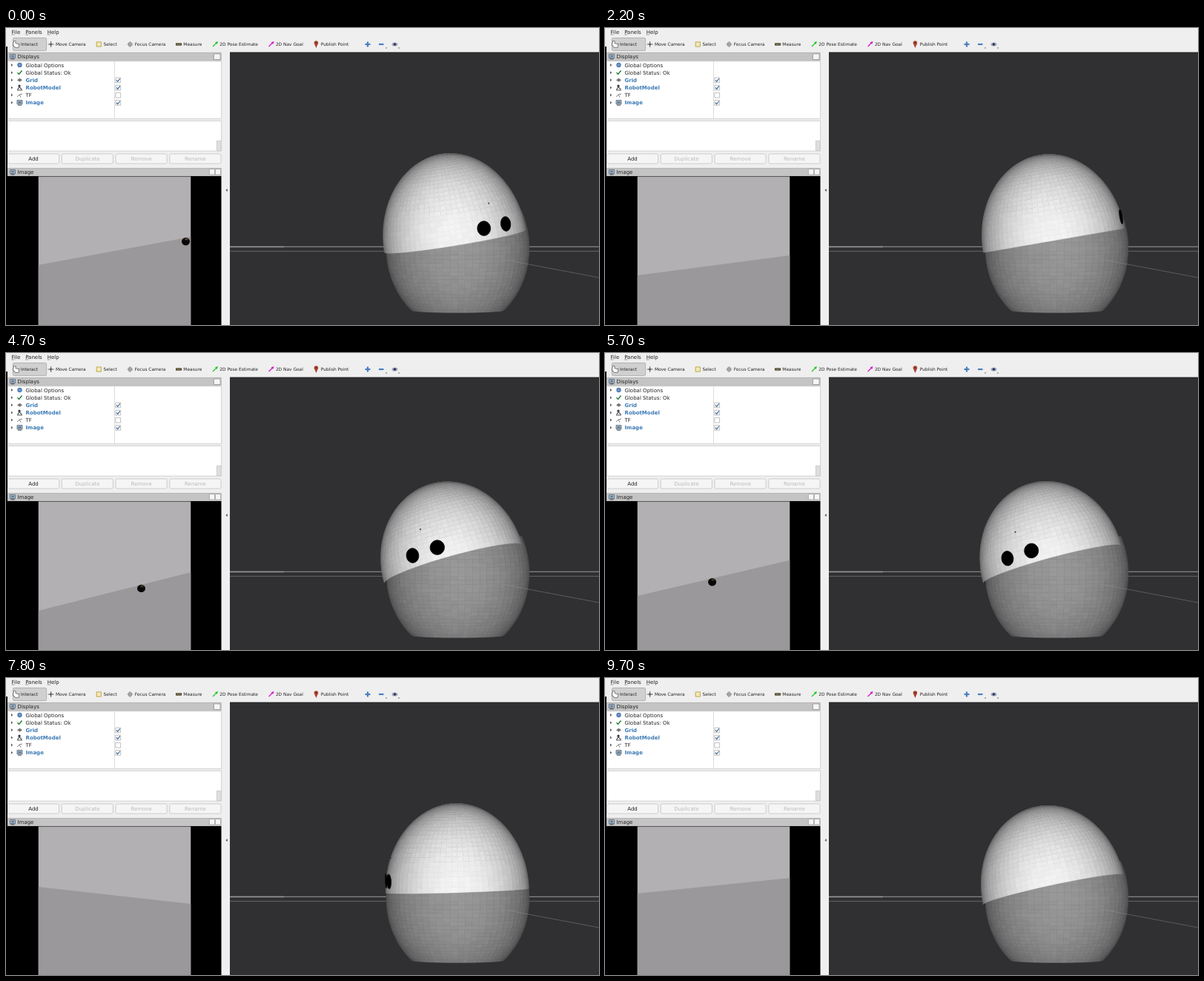
An HTML page with a canvas that plays this animation: 800 px wide and 401 px high, repeating every 9800 ms.

```html
<!DOCTYPE html>
<html lang="en">
<head>
<meta charset="utf-8">
<title>Robot head viewer</title>
<style>
html, body { margin: 0; width: 100%; height: 100%; overflow: hidden; background: #efefef; }
canvas { display: block; }
</style>
</head>
<body>
<canvas id="stage" width="800" height="401"></canvas>
<script>
const W = 800, H = 401, LOOP = 9800, STEP = 100;
const RAD = Math.PI / 180, TURN = Math.PI * 2;
const FONT = '"DejaVu Sans", sans-serif';
const stage = document.getElementById('stage').getContext('2d');

// time, yaw, roll, pitch, horizon height, horizon rise
const POSES = [
  [0, 36.5, -9.2, -3.5, 301, 38],
  [2200, 91, -9.8, 0, 320.5, 27],
  [3700, 72, -15.6, 7, 324, 0],
  [4700, -20, -15.6, 7, 322, 52],
  [6600, -29, -14.8, 4.5, 287.5, 45],
  [7000, -62, -1.8, -1.5, 293.5, -23],
  [9100, -120, -1.8, -1.5, 293.5, -23],
  [9700, -120, -12.1, 4, 280.5, 21]
];

function poseAt(t) {
  const i = POSES.findLastIndex(p => p[0] <= t);
  const a = POSES[i], b = POSES[i + 1] || a;
  const k = (t - a[0]) / (b[0] - a[0] || 1);
  const [, yaw, roll, pitch, level, rise] = a.map((v, j) => v + (b[j] - v) * k);
  return { yaw, roll, pitch, level, rise };
}

const gray = v => { v = Math.round(v); return `rgb(${v},${v - 1},${v})`; };
const jitter = (i, j) => {
  const s = Math.sin(i * 12.9898 + j * 78.233) * 43758.5453;
  return s - Math.floor(s) - 0.5;
};

function layer(paint) {
  const c = document.createElement('canvas');
  c.width = W;
  c.height = H;
  paint(c.getContext('2d'));
  return c;
}

function rect(g, x, y, w, h, fill, edge, round = 0) {
  g.beginPath();
  g.roundRect(x, y, w, h, round);
  g.fillStyle = fill;
  g.fill();
  if (!edge) return;
  g.beginPath();
  g.roundRect(x + 0.4, y + 0.4, w - 0.8, h - 0.8, round);
  g.strokeStyle = edge;
  g.lineWidth = 0.8;
  g.stroke();
}

function line(g, color, width, ...pts) {
  g.strokeStyle = color;
  g.lineWidth = width;
  g.beginPath();
  for (let i = 0; i < pts.length; i += 2) g.lineTo(pts[i], pts[i + 1]);
  g.stroke();
}

function disc(g, color, x, y, rx, ry = rx) {
  g.fillStyle = color;
  g.beginPath();
  g.ellipse(x, y, rx, ry, 0, 0, TURN);
  g.fill();
}

function poly(g, color, pts, edge) {
  g.beginPath();
  for (const p of pts) g.lineTo(p[0], p[1]);
  g.closePath();
  g.fillStyle = color;
  g.fill();
  if (edge) {
    g.strokeStyle = color;
    g.lineWidth = edge;
    g.stroke();
  }
}

// Returns the width of the text
function text(g, str, x, y, size = 7, color = '#222', weight = '') {
  g.font = `${weight} ${size}px ${FONT}`;
  g.fillStyle = color;
  g.fillText(str, x, y);
  return g.measureText(str).width;
}

function cross(g, color, x, y, r, width) {
  line(g, color, width, x - r, y, x + r, y);
  line(g, color, width, x, y - r, x, y + r);
}

function arrow(g, x, color) {
  line(g, color, 1.2, x - 3, 25, x + 2, 20);
  poly(g, color, [[x + 4, 18], [x + 2.7, 22], [x, 19.3]]);
}

function hand(g, x) {
  const shape = [[x - 3, 18], [x - 1, 18], [x - 1, 21], [x + 4, 22], [x + 3, 26], [x - 1, 26], [x - 4, 23]];
  poly(g, '#333', shape, 1.2);
  poly(g, '#fff', shape);
}

function pin(g, x) {
  poly(g, '#a83f2b', [[x - 2.5, 21], [x + 2.5, 21], [x, 27]]);
  disc(g, '#b24a33', x, 20, 2.8);
  disc(g, '#54231b', x, 20, 1);
}

const TOOLS = {
  'Interact': hand,
  'Move Camera': (g, x) => { cross(g, '#444', x, 22, 4, 0.8); disc(g, '#666', x, 22, 1.8); },
  'Select': (g, x) => rect(g, x - 3.5, 18.5, 7, 7, '#f1e9bc', '#b49a32'),
  'Focus Camera': (g, x) => { cross(g, '#777', x, 22, 4, 0.8); g.strokeRect(x - 2, 20, 4, 4); },
  'Measure': (g, x) => rect(g, x - 4, 20.5, 8, 3, '#8b8352', '#333'),
  '2D Pose Estimate': (g, x) => arrow(g, x, '#1fc81f'),
  '2D Nav Goal': (g, x) => arrow(g, x, '#d916c9'),
  'Publish Point': pin
};

function paintToolbar(g) {
  let x = 7.5;
  for (const name of ['File', 'Panels', 'Help']) {
    line(g, '#444', 0.5, x, 9, x + 4, 9);
    x += text(g, name, x, 7.8) + 7;
  }
  rect(g, 9, 13, 46, 18, '#d0d0d0', '#aaa', 2);
  x = 20;
  for (const name in TOOLS) {
    TOOLS[name](g, x - 6.3);
    x += text(g, name, x, 24.2, 5.9) + 23.9;
  }
  cross(g, '#4b7fbd', 488, 22, 3.5, 2.2);
  line(g, '#4b7fbd', 2.2, 503, 22, 509.5, 22);
  disc(g, '#a6aabf', 524.5, 22, 4, 2.6);
  disc(g, '#303658', 524.5, 22, 1.8);
  for (const x of [513, 530]) poly(g, '#444', [[x - 1, 26.5], [x + 1, 26.5], [x, 28]]);
}

function screenIcon(g, x, y) {
  rect(g, x - 3.8, y - 3.5, 7.6, 6, '#dce5ee', '#3c4c5c');
  rect(g, x - 2.3, y - 2, 4.6, 3, '#5f7d99');
  line(g, '#3c4c5c', 1, x - 2.5, y + 3.4, x + 2.5, y + 3.4);
}

function titleBar(g, y, name) {
  rect(g, 2, y, 288.5, 11.5, '#c5c4c5', '#b0afb0');
  screenIcon(g, 9, y + 5.5);
  text(g, name, 15.5, y + 8.3);
}

const ROWS = {
  'Global Options': (g, y) => { disc(g, '#5580b5', 18.5, y, 3.2); disc(g, '#7fa5d0', 18.5, y, 1.3); },
  'Global Status: Ok': (g, y) => line(g, '#237d32', 1.4, 15.5, y, 17.5, y + 2.3, 21.5, y - 2.7),
  'Grid': (g, y) => poly(g, '#777', [[15, y], [18.5, y - 2.5], [22, y], [18.5, y + 2.5]]),
  'RobotModel': (g, y) => {
    disc(g, '#333c4c', 18, y - 2.3, 1.6);
    line(g, '#444c58', 1.2, 15.5, y + 3, 18, y - 1, 21.5, y + 3);
    line(g, '#555', 1, 15, y + 3.5, 22, y + 3.5);
  },
  'TF': (g, y) => {
    line(g, '#777', 0.9, 15, y + 2.4, 18, y - 0.6, 22, y - 1.6);
    line(g, '#777', 0.9, 18, y - 0.6, 20, y + 3);
  },
  'Image': (g, y) => screenIcon(g, 18.5, y)
};

function paintTree(g) {
  titleBar(g, 33, 'Displays');
  rect(g, 280, 34.5, 9.5, 8.5, '#f6f6f6', '#888');
  rect(g, 2, 44.5, 289, 78.5, '#fff', '#c4c4c4');
  line(g, '#d4d4d4', 0.8, 146.5, 45, 146.5, 122);
  Object.keys(ROWS).forEach((name, i) => {
    const y = 50 + i * 10.15, on = i > 1 && name !== 'TF';
    poly(g, '#555', [[7, y - 2], [9.2, y], [7, y + 2]]);
    ROWS[name](g, y);
    text(g, name, 26.5, y + 2.6, 7, on ? '#3b7ab5' : '#222', on ? 'bold' : '');
    if (i > 1) rect(g, 147.5, y - 3.6, 7.5, 7.5, '#fff', '#b0b0b0');
    if (on) line(g, '#3d6f9e', 1.2, 149, y, 150.7, y + 2, 153.7, y - 2);
  });

  rect(g, 2, 125, 289, 41.5, '#fff', '#c4c4c4');
  rect(g, 284, 152, 6.5, 14, '#dedede', '#c8c8c8');
  g.textAlign = 'center';
  ['Add', 'Duplicate', 'Remove', 'Rename'].forEach((name, i) => {
    const x = 2 + i * 72.8;
    rect(g, x, 169.5, 70, 14, '#f5f5f5', '#c2c2c2', 2);
    text(g, name, x + 35, 179.2, 7, i ? '#bababa' : '#222');
  });
  g.textAlign = 'left';
}

const ui = layer(g => {
  rect(g, 0, 0, W, H, '#efeff0');
  paintToolbar(g);
  rect(g, 0, 25, 2, H, '#000');
  paintTree(g);
  titleBar(g, 189, 'Image');
  for (const x of [274, 282]) rect(g, x, 190, 8, 8.5, '#f6f6f6', '#999');
  rect(g, 0, 200, 290.5, 201, '#000');
  poly(g, '#444', [[298.7, 217], [298.7, 221], [296.5, 219]]);

  rect(g, 302, 33, 498, 368, '#302f31');
  line(g, '#1d1c1e', 0.8, 302, 33, 800, 33);
  line(g, '#858486', 1.2, 302, 295.4, 800, 295.4);
  line(g, '#969597', 1.7, 302, 295.5, 375, 295.5);
  line(g, '#6e6d6f', 0.9, 302, 301.4, 800, 301.4);
});

// Lit facets of a stretched sphere between two latitudes
function paintShell(g, o) {
  const { r, high, cols, rows, from, to, yaw, pitch, project } = o;
  const at = (lat, lon) => {
    const c = r * Math.cos(lat);
    return [c * Math.sin(lon), high * Math.sin(lat), c * Math.cos(lon)];
  };
  const dLat = (to - from) / rows, dLon = TURN / cols;
  for (let j = 0; j < rows; j++) {
    for (let i = 0; i < cols; i++) {
      const a = from + j * dLat, l = yaw + i * dLon;
      const [x, y, z] = at(a + dLat / 2, l + dLon / 2);
      const nx = x / r ** 2, ny = y / high ** 2, nz = z / r ** 2;
      const face = (nz * Math.cos(pitch) - ny * Math.sin(pitch)) / Math.hypot(nx, ny, nz);
      if (face < -0.03) continue;
      const shade = o.dark + o.span * Math.max(0, face) + jitter(i, j) * 5;
      const b = a + dLat, k = l + dLon;
      poly(g, gray(shade), [at(a, l), at(a, k), at(b, k), at(b, l)].map(project), 0.5);
    }
  }
}

const body = layer(g => paintShell(g, {
  r: 96.5, high: 110, cols: 60, rows: 26, from: -50 * RAD, to: 27 * RAD,
  yaw: 0, pitch: -0.05, dark: 73, span: 79,
  project: ([x, y, z]) => [609.5 + x, 297 - y + z * 0.05]
}));

function paintHead(g, { yaw, roll, pitch }) {
  const r = 96.5, high = 116.5 - 0.6 * pitch;
  const mx = 609.6 + 0.4 * roll, my = 286.8 - 0.25 * pitch;
  const p = pitch * RAD, q = roll * RAD, turn = yaw * RAD;
  const project = ([x, y, z]) => {
    const v = y * Math.cos(p) + z * Math.sin(p);
    return [mx + x * Math.cos(q) + v * Math.sin(q), my + x * Math.sin(q) - v * Math.cos(q)];
  };
  // Circle on the dome surface
  const spot = (lon, y, size, color) => {
    if (Math.cos(lon) < -0.1) return;
    const s = Math.sin(lon), c = Math.cos(lon);
    const d = r * Math.sqrt(1 - (y / high) ** 2) + 0.5;
    const pts = [];
    for (let a = 0; a < TURN; a += 0.2) {
      const w = size * Math.cos(a);
      pts.push(project([d * s + w * c, y + size * Math.sin(a), d * c - w * s]));
    }
    poly(g, color, pts, 0.8);
  };

  const rim = [];
  for (let a = 0; a < TURN; a += 0.1) rim.push(project([r * Math.sin(a), 0, r * Math.cos(a)]));
  poly(g, '#2a292b', rim, 1);
  g.drawImage(body, 0, 0);
  paintShell(g, {
    r, high, cols: 72, rows: 26, from: 0, to: Math.PI / 2,
    yaw: turn, pitch: p, dark: 95, span: 149, project
  });
  for (const side of [-1, 1]) spot(turn + side * 11.2 * RAD, 16, 9.8, '#000');
  if (Math.cos(turn) > 0) spot(turn, 47.5, 0.7, '#333');
  line(g, 'rgba(150,149,151,.6)', 0.7, 668, 312, 800, 337);
}

function paintCamera(g, { yaw, level, rise }) {
  const left = 43.5, width = 206, mid = left + width / 2;
  const horizon = x => level - rise * (x - mid) / width;
  g.save();
  g.beginPath();
  g.rect(left, 200.5, width, 201);
  g.clip();
  rect(g, left, 200, width, 201, '#b2b0b2');
  poly(g, '#9a989a', [[left, horizon(left)], [left + width, horizon(left + width)], [left + width, H], [left, H]]);
  // Two balls at fixed bearings, seen as the head turns
  for (const bearing of [-24.5, 24.5]) {
    const x = mid + 8 * (yaw - bearing), y = horizon(x) + 5;
    disc(g, '#080706', x, y, 5.5, 5.2);
    disc(g, bearing > 0 ? '#5c4236' : '#3a3821', x + 1, y - 3, 2.5, 1.3);
  }
  g.restore();
}

function paint(t) {
  const pose = poseAt(t);
  stage.drawImage(ui, 0, 0);
  paintCamera(stage, pose);
  paintHead(stage, pose);
}

const start = performance.now();
let shown = -1;
function tick() {
  const t = Math.floor(((performance.now() - start) % LOOP) / STEP) * STEP;
  if (t !== shown) paint(shown = t);
  requestAnimationFrame(tick);
}
tick();
</script>
</body>
</html>
```
